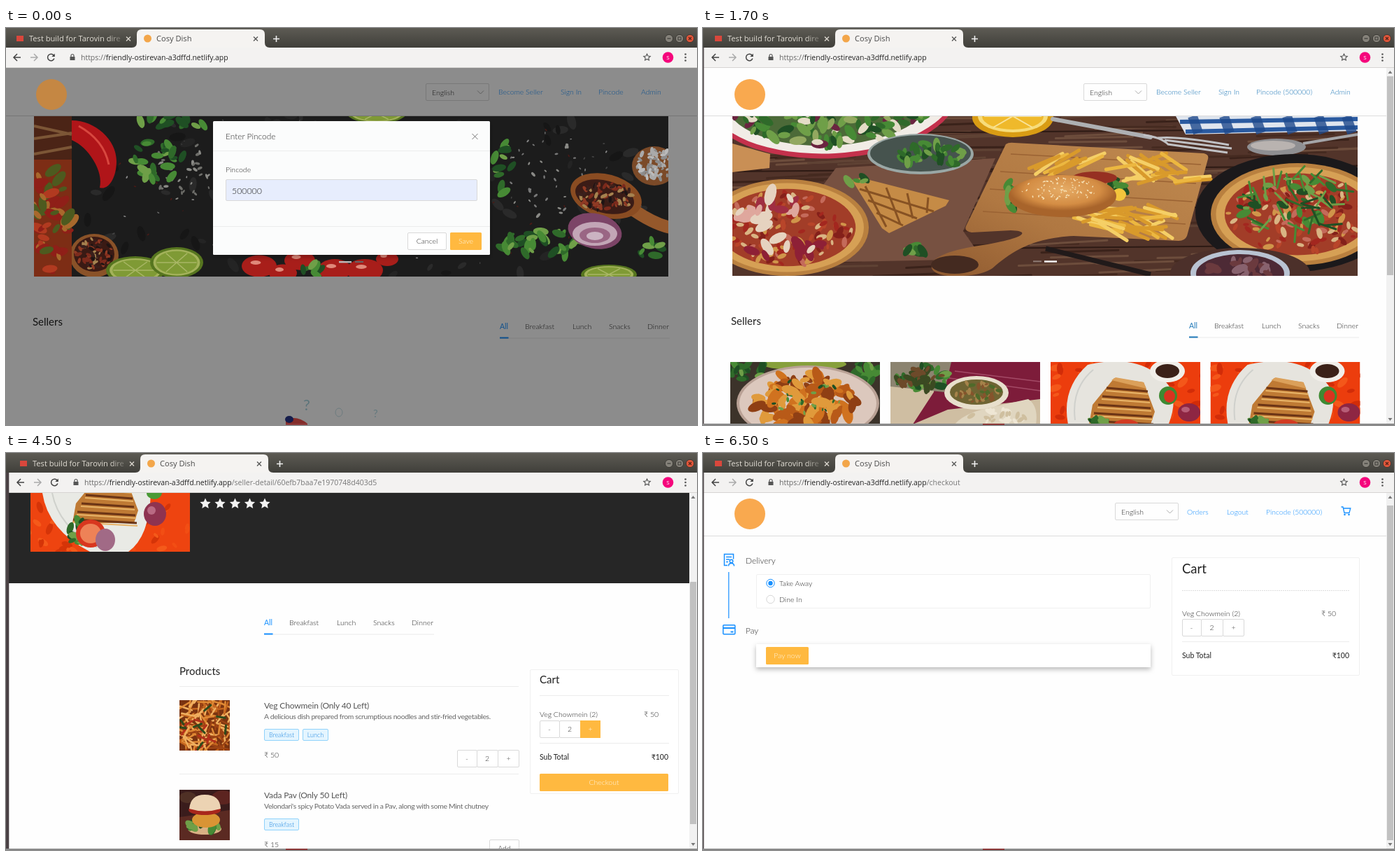
An HTML page for the animation above (8 s loop, 988 by 567 pixels).

```html
<!DOCTYPE html>
<html lang="en">
<head>
<meta charset="utf-8">
<title>Cosy Dish</title>
<style>
html, body { margin: 0; width: 100%; height: 100%; overflow: hidden; background: #fff; }
#stage { display: block; width: 988px; height: 567px; }
text { font-family: Lato, "Noto Sans", sans-serif; font-weight: 300; white-space: pre; }
text.ui { font-family: "Open Sans", "Noto Sans", sans-serif; font-weight: 400; }
text.med { font-weight: 400; }
.scene { animation: 8s step-end infinite; }
#home { animation-name: home; }
#login { animation-name: login; }
#seller { animation-name: seller; }
#checkout { animation-name: checkout; }
@keyframes home { 0% { visibility: hidden; } 6.25%, 100% { visibility: visible; } }
@keyframes login { 0% { visibility: hidden; } 31.25%, 100% { visibility: visible; } }
@keyframes seller { 0% { visibility: hidden; } 56.25%, 100% { visibility: visible; } }
@keyframes checkout { 0% { visibility: hidden; } 81.25%, 100% { visibility: visible; } }
</style>
</head>
<body>
<svg id="stage" viewBox="0 0 988 567"></svg>
<script>
let seed = 7;
const rnd = () => (seed = seed * 16807 % 2147483647) / 2147483647;
const pick = list => list[Math.floor(rnd() * list.length)];
const many = (n, make) => Array.from({ length: n }, make).join('');

const R = (x, y, w, h, fill, more = '') => `<rect x="${x}" y="${y}" width="${w}" height="${h}" fill="${fill}" ${more}/>`;
const box = (x, y, w, h, fill = '#fff', line = '#d9d9d9', r = 1.5) => R(x + .5, y + .5, w - 1, h - 1, fill, `stroke="${line}" rx="${r}"`);
const E = (x, y, rx, ry, fill, more = '') => `<ellipse cx="${x}" cy="${y}" rx="${rx}" ry="${ry}" fill="${fill}" ${more}/>`;
const P = (d, fill, more = '') => `<path d="${d}" fill="${fill}" ${more}/>`;
const L = (d, color, w = 1, more = '') => P(d, 'none', `stroke="${color}" stroke-width="${w}" ${more}`);
const T = (x, y, s, size = 10.5, fill = '#2c2c2c', more = '') => `<text x="${x}" y="${y}" font-size="${size}" fill="${fill}" ${more}>${s}</text>`;
const mid = 'text-anchor="middle"', end = 'text-anchor="end"', med = 'class="med"', round = 'stroke-linecap="round"';
const clip = (x, y, w, h, body) => `<svg x="${x}" y="${y}" width="${w}" height="${h}" viewBox="${x} ${y} ${w} ${h}">${body}</svg>`;
const move = (x, y, body) => `<g transform="translate(${x} ${y})">${body}</g>`;
const cross = (x, y, r, color, w = 1) => L(`M${x - r} ${y - r}l${2 * r} ${2 * r}m0 ${-2 * r}l${-2 * r} ${2 * r}`, color, w);
const spot = (cx, cy, rx, ry) => {
  const a = rnd() * 6.283, d = Math.sqrt(rnd());
  return [(cx + rx * d * Math.cos(a)).toFixed(1), (cy + ry * d * Math.sin(a)).toFixed(1)];
};
const blobs = (n, cx, cy, rx, ry, colors, s) => many(n, () => {
  const [x, y] = spot(cx, cy, rx, ry), k = s * (.6 + rnd() * .8);
  return E(x, y, k.toFixed(1), (k * .5).toFixed(1), pick(colors), `transform="rotate(${Math.floor(rnd() * 180)} ${x} ${y})"`);
});
const sticks = (n, cx, cy, rx, ry, colors, len, w, a0 = 0, spread = 3.1) => many(n, () => {
  const [x, y] = spot(cx, cy, rx, ry), a = a0 + (rnd() - .5) * spread;
  const dx = len / 2 * Math.cos(a), dy = len / 2 * Math.sin(a);
  return L(`M${(x - dx).toFixed(1)} ${(y - dy).toFixed(1)}l${(2 * dx).toFixed(1)} ${(2 * dy).toFixed(1)}`, pick(colors), w, round);
});

const GOLD = '#ffb940', BLUE = '#1890ff', LINE = '#ececec';
const greens = ['#2f6a2a', '#478a35', '#1f4f24', '#6f9f48'];
const reds = ['#a3271f', '#84201a', '#b8452a', '#d0954a'];

/* Browser window */
const chrome = (dx, path = '') => R(0, 0, 988, 28, 'url(#bar)') + R(0, 28, 988, 28, '#f3f2f1') + R(0, 56, 988, 1, '#d6d4d2') +
  move(dx, 0,
    R(15, 11, 10, 8, '#d9473c') + T(33, 19, 'Test build for Tarovin dire', 11.1, 'url(#fade)', 'class="ui"') + cross(175, 15.5, 3, '#dcd8d0', 1.3) +
    P('M180 28Q187 28 187 21V9Q187 2 194 2H363Q370 2 370 9V21Q370 28 377 28Z', '#f5f3f1') +
    E(202.5, 15, 5.5, 5.5, '#f3a64a') + T(215, 19, 'Cosy Dish', 11.1, '#4a4a4a', 'class="ui"') + cross(357, 15.5, 3, '#555', 1.3) +
    L('M382 15.5h9m-4.500-4.500v9', '#eee', 1.6) +
    L('M21 42h-10m5-5l-5 5 5 5', '#444', 1.5) + L('M35 42h10m-5-5l5 5-5 5', '#aaa', 1.5) +
    L('M68.500 39.500a4.800 4.800 0 1 0 .4 4', '#444', 1.5) + P('M69.800 36.500v4.500h-4.500z', '#444') +
    R(91.5, 41, 7, 5, '#555') + L('M93 41v-1.500a2 2 0 0 1 4 0v1.500', '#555', 1.2) +
    T(107, 45.5, `<tspan fill="#666">https://</tspan>friendly-ostirevan-a3dffd.netlify.app<tspan fill="#777">${path}</tspan>`, 10.5, '#222', 'class="ui"')) +
  star(916.5, 42, 5, 'none', 'stroke="#555" stroke-width="1.1"') +
  E(946.5, 42, 7.8, 7.8, '#f5067c') + T(946.5, 45, 'S', 8, '#fff', mid + ' class="ui"') +
  [37.5, 42, 46.5].map(y => E(971.5, y, 1.3, 1.3, '#555')).join('') +
  [['#85827a', 948], ['#85827a', 963], ['#e2573b', 978]].map(([c, x]) => E(x, 15, 5.6, 5.6, c, 'stroke="#33322e" stroke-width=".8"')).join('') +
  L('M945.500 15h5', '#3c3b37', 1.2) + R(961, 13, 4, 4, 'none', 'stroke="#3c3b37"') + cross(978, 15, 2, '#51231a', 1.2) +
  (dx ? R(0, 28, dx - .7, 537, '#4a4144') : '');

const star = (x, y, r, fill, more = '') => {
  const pts = Array.from({ length: 10 }, (_, i) => {
    const a = i * Math.PI / 5, k = i % 2 ? r * .48 : r;
    return (x + k * Math.sin(a)).toFixed(2) + ',' + (y - k * Math.cos(a)).toFixed(2);
  });
  return `<polygon points="${pts.join(' ')}" fill="${fill}" ${more}/>`;
};

const scrollbar = (top, bottom) => R(977, 57, 11, 508, '#f1f1f1') + R(978, top, 9, bottom - top, '#c1c1c1') +
  P('M979.500 65l3-4 3 4z', '#777') + P('M979.500 557l3 4 3-4z', '#777');

const select = (x, y) => box(x, y, 91, 25, 'none') + T(x + 9, y + 16.5, 'English') + L(`M${x + 74} ${y + 10.5}l4.500 4.500 4.500-4.500`, '#aaa', 1);
const links = (y, color, list) => list.map(([x, s]) => T(x, y, s, 10.4, color)).join('');
const tabs = (x, y, active = BLUE) => R(x, y + 12.5, 243, 1, LINE) + R(x, y + 11.5, 12.5, 2, active) +
  T(x, y, 'All', 10.5, active, med) + [[36, 'Breakfast'], [104, 'Lunch'], [156, 'Snacks'], [211, 'Dinner']].map(([d, s]) => T(x + d, y, s)).join('');
const button = (x, y, w, s, h = 25) => R(x, y, w, h, GOLD, 'rx="1.500"') + T(x + w / 2, y + h / 2 + 3.8, s, 10.5, '#fff6e2', mid);
const stepper = (x, y, a, b, w, hot) => box(x, y, a + 1, 25) + box(x + a, y, b - a + 1, 25) +
  (hot ? R(x + b, y, w - b, 25, GOLD) : box(x + b, y, w - b, 25)) +
  T(x + a / 2, y + 16, '-', 10.5, '#444', mid) + T(x + (a + b) / 2, y + 16, '2', 10.5, '#333', mid) + T(x + (b + w) / 2, y + 16, '+', 10.5, hot ? '#fff' : '#444', mid);

/* Pictures */
const leaves = (x, y, rx, ry, n = 16) => blobs(n, x, y, rx, ry, greens, 8);
const lime = (x, y, rx, ry) => E(x, y, rx, ry, '#56751f') + E(x, y, rx * .88, ry * .85, '#a3b25a') + E(x, y, rx * .78, ry * .74, '#7f9a35') +
  L(`M${x - rx * .75} ${y}h${rx * 1.5}M${x - rx * .4} ${y - ry * .6}L${x + rx * .4} ${y + ry * .6}M${x + rx * .4} ${y - ry * .6}L${x - rx * .4} ${y + ry * .6}`, '#a9b766', 1.5);
const pepper = ['#3a201c', '#7c2a1c', '#a5824f', '#1d1414', '#8f3a24'];

const slate = clip(40, 126, 907, 229,
  R(40, 126, 907, 229, '#1c1c1c') + blobs(110, 520, 240, 450, 140, ['#242424', '#161616', '#2a2a2a'], 9) +
  blobs(110, 520, 235, 430, 120, ['#666', '#888', '#4a1a16', '#444'], 1.6) +
  blobs(40, 255, 205, 50, 40, ['#8a8a86', '#6e6e6a'], 3) + blobs(35, 770, 215, 60, 60, ['#8a8a86', '#777'], 3) +
  leaves(215, 190, 42, 28, 26) + leaves(240, 133, 60, 9, 12) + leaves(765, 308, 60, 20, 32) + leaves(712, 195, 14, 40, 12) + leaves(925, 315, 25, 12, 8) +
  P('M94 132C128 132 158 160 158 190C158 215 146 232 134 228C140 205 118 170 94 160Z', '#b01519') + L('M104 140Q140 160 147 195', '#d8473f', 3) +
  E(126, 325, 35, 31, '#8a5228') + E(126, 323, 29, 25, '#3a1a14') + blobs(70, 126, 323, 26, 22, pepper, 4) +
  lime(185, 346, 42, 20) + lime(244, 335, 38, 22) + lime(530, 122, 42, 14) + lime(862, 352, 40, 14) +
  [[362, 340, 25], [396, 350, 20], [420, 332, 22], [470, 345, 24], [513, 346, 26], [545, 330, 16]].map(([x, y, r]) =>
    E(x, y, r, r * .62, '#a81e1a') + E(x - 5, y - 5, r * .3, 3, '#e0897a')).join('') + leaves(440, 345, 20, 8, 8) +
  L('M890 255Q925 280 950 285', '#95582b', 18) + E(858, 240, 52, 31, '#8a4c22', 'transform="rotate(15 858 240)"') +
  E(856, 241, 43, 23, '#3b1c16', 'transform="rotate(15 856 241)"') + blobs(90, 856, 241, 39, 20, pepper, 4) +
  E(927, 197, 32, 28, '#7b4a28') + blobs(70, 928, 194, 27, 22, ['#aaa', '#8c8c8c', '#bbb'], 4) +
  E(842, 290, 39, 25, '#7c4467', 'transform="rotate(12 842 290)"') + E(842, 294, 32, 17, '#c2a5b6') + E(842, 296, 22, 11, '#9a6684') + E(842, 297, 12, 6, '#cbb3c2') +
  R(40, 126, 54, 229, '#4b2416') + L('M40 140l54 12M40 158l54-8M40 180l54-10', '#7c5636', 4) + R(40, 188, 54, 167, '#7d2d15') +
  blobs(45, 67, 270, 30, 80, ['#8f1f18', '#a8682c', '#4d5a1f', '#b13a20'], 10));

const planks = sticks(160, 489, 240, 520, 125, ['#5f4234', '#452a20', '#6d4d3c', '#3a221a'], 110, 3, -.03, .06) +
  [152, 205, 262, 318].map(y => L(`M42 ${y}L936 ${y - 8}`, '#2d1a14', 2)).join('');
const salad = ['#e4dcc6', ...greens, ...greens, '#6b2440', '#93a860'];
const pizza = (x, y, rx, ry) => E(x, y, rx, ry, '#b9803f') + E(x, y, rx * .94, ry * .92, '#d6a055') + E(x, y, rx * .84, ry * .8, '#a23d28') + blobs(130, x, y, rx * .8, ry * .75, [...reds, '#d9b483', '#c46a5a'], 6);
const fries = ['#ecb740', '#f5cf66', '#d99a2b'];
const table = clip(42, 126, 894, 228,
  R(42, 126, 894, 228, '#52342a') + planks +
  P('M42 165L96 180 95 200 42 206Z', '#c98f55') +
  P('M190 200L418 186 372 290 400 330 200 334 160 240Z', '#775141') +
  E(185, 102, 178, 84, '#c4314c', 'transform="rotate(-3 185 102)"') + E(185, 98, 174, 81, '#f1ece6', 'transform="rotate(-3 185 98)"') +
  E(182, 98, 150, 70, '#4c6a38', 'transform="rotate(-3 182 98)"') + blobs(170, 180, 118, 135, 48, salad, 9) +
  E(311, 180, 76, 29, '#9aa7a5') + E(311, 179, 72, 26, '#46534e') + leaves(328, 182, 46, 18, 36) +
  E(443, 128, 58, 28, '#d99c14') + E(443, 126, 50, 23, '#f7dc7a') + E(443, 126, 44, 19, '#efb92b') + L('M402 126h82M443 126l-28 16M443 126l28 16', '#f9e39a', 2) +
  L('M500 130L640 156', '#aeb0b3', 6, round) + L('M630 153Q655 156 665 166L750 178M660 160L756 172M650 157Q680 154 752 167', '#c0c1c4', 3) +
  P('M676 126H936V147L690 152Z', '#dfe5ee') + L('M682 134L936 130M690 148L936 142', '#2a5aa0', 6) + [700, 745, 790, 835, 880, 920].map(x => L(`M${x} 126l8 24`, '#1f4a8c', 14, 'opacity=".8"')).join('') +
  E(820, 170, 42, 12, '#8f8f92') + E(815, 168, 32, 7, '#b9b3b0') + L('M858 165L936 152', '#a5a5a8', 4) +
  P('M433 166Q437 163 445 164L716 179Q724 181 722 187L692 297Q689 304 680 304L530 297C470 300 440 320 414 343Q395 356 350 354Q318 350 330 332Q345 318 400 310C460 300 470 290 440 289L384 292Q373 290 376 283Z', 'url(#board)') +
  L('M440 180L712 195M425 205L705 222M410 230L700 248M400 262L690 280', '#9a6233', 1.5) + E(360, 338, 34, 13, '#442a20') +
  P('M213 217L226 214 352 246 347 254 266 293 256 286Z', '#c58b46') + L('M232 226L262 284M262 228L282 280M292 236L300 272M322 242L320 264M224 230L330 262M236 246L306 272M248 264L286 282', '#875223', 3) +
  leaves(308, 316, 16, 6, 6) + leaves(225, 218, 25, 5, 6) +
  sticks(14, 520, 192, 50, 12, fries, 38, 5, -.45, .4) + sticks(18, 640, 200, 45, 18, fries, 42, 5, .2, 1.2) + sticks(32, 610, 274, 62, 20, fries, 46, 5, .1, 1) + sticks(5, 702, 216, 14, 3, fries, 36, 5, -.15, .2) +
  leaves(440, 240, 8, 20, 12) + leaves(595, 225, 14, 12, 12) + E(560, 214, 32, 9, '#963022') + E(595, 238, 10, 9, '#f4c53c') +
  E(514, 240, 77, 30, 'url(#bread)') + blobs(80, 510, 230, 58, 16, ['#f6dfb2'], 1.5) +
  pizza(120, 285, 117, 69) + blobs(18, 100, 262, 50, 25, ['#dfa79d', '#a02e42', '#e6d3c0'], 12) + blobs(12, 130, 315, 65, 18, ['#8e2036', '#e6d3c0'], 11) +
  E(846, 264, 142, 84, '#1b191b') + pizza(850, 266, 124, 73) + leaves(840, 252, 75, 40, 24) + sticks(40, 848, 248, 78, 46, greens, 24, 3) +
  E(768, 350, 100, 36, '#4c302a') + E(768, 350, 71, 33, '#b9c3d2') + E(768, 351, 63, 28, '#4d2a35') + blobs(20, 768, 344, 45, 15, ['#6b3a3e', '#88626e'], 9) +
  L('M490 315L640 352', '#211a1a', 7));
const dots = (y, a, b) => R(a, y, 12, 2, '#fff', 'opacity=".35"') + R(b, y, 18, 2.4, '#fff');

const toast = P('M552 566L557 538 588 500 630 506 646 548 640 566Z', '#bf7a34') + P('M584 503L590 499 630 506 634 515Z', '#dba05a') +
  [516, 528, 540, 552, 563].map((y, i) => L(`M${577 - i * 6} ${y - 2}L${636 + i * 2} ${y + 3}`, '#6b3415', 3) + L(`M${576 - i * 6} ${y + 2}L${637 + i * 2} ${y + 7}`, '#e8b468', 2)).join('');
const club = R(497, 477, 214, 88, '#ec3d0d') + blobs(60, 604, 520, 130, 55, ['#f4571a', '#d22c08', '#f04813'], 7) +
  P('M522 566Q512 515 550 481Q620 465 655 500Q685 520 664 570Z', '#e6e4de') + L('M532 560Q526 515 558 488', '#cfd0cc', 2) +
  E(664, 490, 25, 16, '#f1eee9') + E(664, 490, 17, 10, '#3b2118') + toast + leaves(566, 561, 18, 5, 10) + E(605, 567, 18, 8, '#d23a22') +
  E(665, 525, 13, 13, '#3e8a33') + E(667, 526, 8, 9, '#d9331f') + E(695, 549, 16, 13, '#8e2643') + E(690, 545, 6, 4, '#b75d77');
const curry = R(39, 477, 214, 88, '#3c332a') + E(145, 480, 60, 9, '#87a03c') + leaves(60, 490, 28, 14) + leaves(235, 490, 18, 16) +
  E(150, 536, 102, 54, '#b9a195') + E(150, 536, 98, 51, '#dcc8bd') + blobs(120, 145, 532, 70, 40, ['#d0721f', '#b85a18', '#e09a3b', '#8f3f14'], 11) + blobs(24, 145, 525, 55, 25, greens, 3);
const wraps = R(268, 477, 214, 88, '#cfbea2') + P('M335 477H482V530L440 535 350 545 300 566 330 520Z', '#7d1c3a') + L('M360 490L482 505M352 500L482 518', '#a34a66', 1.5) +
  P('M268 477H355L345 520 268 512Z', '#8c8470') + leaves(312, 500, 38, 18, 26) + blobs(25, 312, 502, 36, 16, ['#6d4a2a', '#3b4a22'], 7) +
  E(391, 521, 46, 24, '#e8dfcc') + E(391, 520, 38, 18, '#6f6433') + blobs(45, 391, 520, 33, 14, ['#85542c', '#4f6a2a', '#a5824a'], 4) +
  P('M360 566Q375 548 420 540L465 530Q480 540 476 566Z', '#e0d6c0') + blobs(24, 425, 554, 45, 9, ['#cfbf9f', '#eee6d4'], 5);
const cards = clip(39, 477, 214, 88, curry) + clip(268, 477, 214, 88, wraps) + clip(497, 477, 214, 88, club) + move(228.5, 0, clip(497, 477, 214, 88, club));

/* Scenes */
const logo = (x, y, fill = '#f9a94f') => E(x, y, 22, 22, fill);
const mask = R(0, 57, 988, 510, '#000', 'opacity=".45"');
const page = R(0, 57, 988, 510, '#fefefe');

const pincode = chrome(0) + page + R(0, 125, 988, 1, '#d5d5d5') + select(600, 79) +
  links(95, BLUE, [[704, 'Become Seller'], [793, 'Sign In'], [847, 'Pincode'], [908, 'Admin']]) +
  T(38, 425, 'Sellers', 15, '#222', med) + tabs(706, 430) +
  T(425, 546, '?', 22, '#a5d2de', med) + T(525, 556, '?', 15, '#b4dbe4', med) + E(476, 549, 5, 6, 'none', 'stroke="#c5dfe6"') +
  P('M400 567V560Q415 552 431 565V567Z', '#f0524c') + E(405, 559, 6, 5, '#26348a') +
  mask + logo(65, 95, '#c58743') + slate + R(476, 333, 18, 2.4, '#bbb') + R(499, 333, 12, 2, '#666') +
  R(296, 133, 396, 191, '#fbfcfc', 'rx="1.500" filter="url(#soft)"') +
  T(314, 158.5, 'Enter Pincode', 11.9) + cross(670.5, 155, 4, '#777') + R(296, 175, 396, 1, LINE) +
  T(314, 206, 'Pincode') + box(314, 216, 360, 31, '#e7edfd') + T(323, 237, '500000', 12.3, '#222') + R(296, 283, 396, 1, LINE) +
  box(574, 292, 56, 25) + T(602, 308, 'Cancel', 10.5, '#333', mid) + button(635, 292, 45, 'Save');

const shop = color => page + R(0, 125, 988, 1, '#dcdcdc') + select(544, 79) +
  links(95, color, [[648, 'Become Seller'], [737, 'Sign In'], [791, 'Pincode (500000)'], [897, 'Admin']]) +
  table + dots(332.3, 472, 488) + T(40, 424, 'Sellers', 15, '#222', med) + tabs(695, 429, color) + cards;

const home = shop('#1f78b8') + logo(67, 95) + scrollbar(69, 353) + chrome(2);

const login = shop(BLUE) + mask + logo(67, 95, '#bf8344') + R(640, 57, 44, 510, 'url(#side)') + R(684, 57, 304, 510, '#fdfefe') +
  T(702, 82, 'Login', 11.9) + cross(966.5, 78, 4, '#777') + R(684, 98, 304, 1, LINE) +
  box(702, 117, 268, 25, '#e7edfd') + T(712, 133, '5550100482', 10.5, '#222') +
  R(702, 159.5, 268, 24.5, '#ffd285', 'rx="1.500"') + L('M805 168a4 4 0 0 1 7 1', '#fff2d9') + T(819, 175.5, 'SEND OTP', 10.3, '#fff4de') + chrome(2);

const tag = (x, y, w, s) => box(x, y, w, 17, '#e4f5ff', '#8fd2fb') + T(x + w / 2, y + 11.7, s, 9, '#1d86e0', mid);
const product = (y, name, info, tags, price) => T(369, y + 12, name, 12, '#555', med + ' letter-spacing="-.15"') +
  T(369, y + 27, info, 10.4, '#666', med + ' letter-spacing="-.34"') + tags + T(369, y + 82, '₹ ' + price);
const noodles = R(248, 353, 72, 72, '#7a3310') + sticks(150, 284, 389, 42, 42, ['#e08a35', '#c5661f', '#f0b060', '#9c4314'], 18, 2.5) + sticks(16, 284, 389, 34, 34, ['#2f4a1c', '#b3301a'], 12, 3);
const bun = R(248, 481, 72, 72, '#3a1c1c') + P('M248 520L320 510V553H248Z', '#5b2a22') + E(310, 492, 16, 10, '#5c2420') + E(260, 492, 12, 8, '#4f3025') +
  E(284, 537, 24, 8, '#d9b184') + leaves(283, 532, 20, 5, 10) + E(286, 524, 20, 11, '#d99434') + E(284, 510, 23, 7, '#a8261c') + P('M262 508Q264 488 284 488Q306 488 307 508Q284 515 262 508Z', '#ecd3b3');
const platter = clip(35, 57, 228, 84, R(35, 57, 228, 84, '#ee4410') + blobs(70, 149, 99, 130, 50, ['#f55a1a', '#d53408', '#f24e14'], 7) +
  P('M52 57Q60 110 120 141H175Q205 120 207 57Z', '#e9eae5') + L('M66 57Q75 105 130 135', '#cfd1cc', 2) + move(-457, -466, toast) + leaves(105, 112, 20, 16, 16) +
  E(121, 115, 21, 20, '#d8371f') + E(121, 115, 15, 14, '#ee8257') + E(142, 124, 14, 16, '#a16a86') + E(213, 87, 16, 17, '#8e3350') + E(208, 82, 6, 6, '#b96a83') + E(212, 57, 11, 9, '#4a9a36'));

const seller = page + R(0, 57, 977, 129, '#262626') + platter + [285, 306, 327.5, 348.5, 370].map(x => star(x, 72.5, 8, '#f3f3f3')).join('') +
  tabs(369, 246) + T(248, 317, 'Products', 15, '#222', med) + R(248, 333, 485, 1, LINE) +
  clip(248, 353, 72, 72, noodles) + product(353, 'Veg Chowmein (Only 40 Left)', 'A delicious dish prepared from scrumptious noodles and stir-fried vegetables.',
    tag(369, 394, 50, 'Breakfast') + tag(424, 394, 37, 'Lunch'), 50) + stepper(645, 424, 28, 58, 89) + R(248, 458, 485, 1, LINE) +
  clip(248, 481, 72, 72, bun) + product(481, 'Vada Pav (Only 50 Left)', "Velondari's spicy Potato Vada served in a Pav, along with some Mint chutney", tag(369, 522, 50, 'Breakfast'), 15) +
  box(691, 552, 43, 25) + T(712.5, 567.5, 'Add', 10.5, '#333', mid) +
  box(749, 309, 213, 178, '#fff', '#f0f0f0') + T(763, 329, 'Cart', 15, '#222', med) + R(763, 346, 185, 1, LINE) +
  T(763, 377, 'Veg Chowmein (2)') + T(912, 377, '₹ 50') + stepper(763, 382, 28, 58, 87, true) + R(763, 414, 185, 1, LINE) +
  T(763, 438, 'Sub Total', 10.5, '#222', med) + T(947, 438, '₹100', 10.5, '#222', med + ' ' + end) + button(763, 458, 184, 'Checkout') +
  scrollbar(184, 530) + chrome(5, '/seller-detail/60efb7baa7e1970748d403d5');

const radio = (y, on) => E(96.5, y, 5.7, 5.7, '#fff', `stroke="${on ? BLUE : '#d5d5d5'}"`) + (on ? E(96.5, y, 3.2, 3.2, BLUE) : '');
const checkout = page + logo(67, 87) + R(0, 118, 977, 1, '#dcdcdc') + select(589, 71) +
  links(87.5, BLUE, [[692, 'Orders'], [749, 'Logout'], [805, 'Pincode (500000)']]) +
  L('M912.500 77h2.500l2 8.500h7l1.800-6.500h-10', BLUE, 1.3) + E(917.5, 88, 1.3, 1.3, BLUE) + E(923.5, 88, 1.3, 1.3, BLUE) +
  L('M35 160.500h-4.500v-16h13v7M33 148.500h8M33 152h5M33 155.500h3', BLUE, 1.5) + E(40.5, 154.5, 2.3, 2.3, '#fff', `stroke="${BLUE}" stroke-width="1.400"`) + L('M36.500 161.500q0-4 4-4t4 4', BLUE, 1.5) +
  T(61, 158, 'Delivery', 11.9) + R(36.2, 170, 1.2, 66, BLUE) + box(76, 173, 564, 49, '#fff', '#f0f0f0') +
  radio(186, true) + T(109, 190, 'Take Away') + radio(209) + T(109, 213, 'Dine In') +
  R(28.8, 245.8, 17, 13, 'none', `stroke="${BLUE}" stroke-width="1.500" rx="1"`) + L('M29 250h17M39.500 255.500h4', BLUE, 1.8) + T(61, 258, 'Pay', 11.9) +
  R(76, 273, 564, 33, '#fff', 'filter="url(#soft)"') + button(90, 277, 61, 'Pay now') +
  box(670, 149, 269, 169, '#fff', '#f0f0f0') + T(685, 172, 'Cart', 18.5, '#222', med) + L('M685 196.500H924', '#dedede', 1, 'stroke-dasharray="2 1"') +
  T(685, 232.5, 'Veg Chowmein (2)') + T(884, 232.5, '₹ 50') + stepper(685, 237, 27, 58, 89) + R(685, 269, 239, 1, LINE) +
  T(685, 293, 'Sub Total', 10.5, '#222', med) + T(924, 293, '₹100', 10.5, '#222', med + ' ' + end) +
  scrollbar(75, 553) + chrome(2, '/checkout');

const defs = `<defs>
<linearGradient id="bar" x2="0" y2="1"><stop stop-color="#5d5b54"/><stop offset="1" stop-color="#403f3a"/></linearGradient>
<linearGradient id="fade" gradientUnits="userSpaceOnUse" x1="145" x2="168" y1="0" y2="0"><stop stop-color="#dfdbd2"/><stop offset="1" stop-color="#dfdbd2" stop-opacity=".1"/></linearGradient>
<linearGradient id="side"><stop stop-opacity="0"/><stop offset="1" stop-opacity=".18"/></linearGradient>
<linearGradient id="board" x1="1" x2="0" y2="1"><stop stop-color="#c08a50"/><stop offset=".6" stop-color="#b07842"/><stop offset="1" stop-color="#8f5a30"/></linearGradient>
<radialGradient id="bread" cy=".35"><stop stop-color="#e6ac66"/><stop offset=".7" stop-color="#d48d44"/><stop offset="1" stop-color="#a8642b"/></radialGradient>
<filter id="soft" x="-10%" y="-30%" width="120%" height="180%"><feDropShadow dx="0" dy="3" stdDeviation="3.5" flood-opacity=".28"/></filter>
</defs>`;
const scene = (id, body) => `<g class="scene" id="${id}">${body}</g>`;
document.getElementById('stage').innerHTML = defs + scene('pincode', pincode) + scene('home', home) + scene('login', login) +
  scene('seller', seller) + scene('checkout', checkout) + R(0, 565, 988, 2, '#8c8c8c') + R(400, 565, 31, 2, '#8c3a3a');
</script>
</body>
</html>
```
